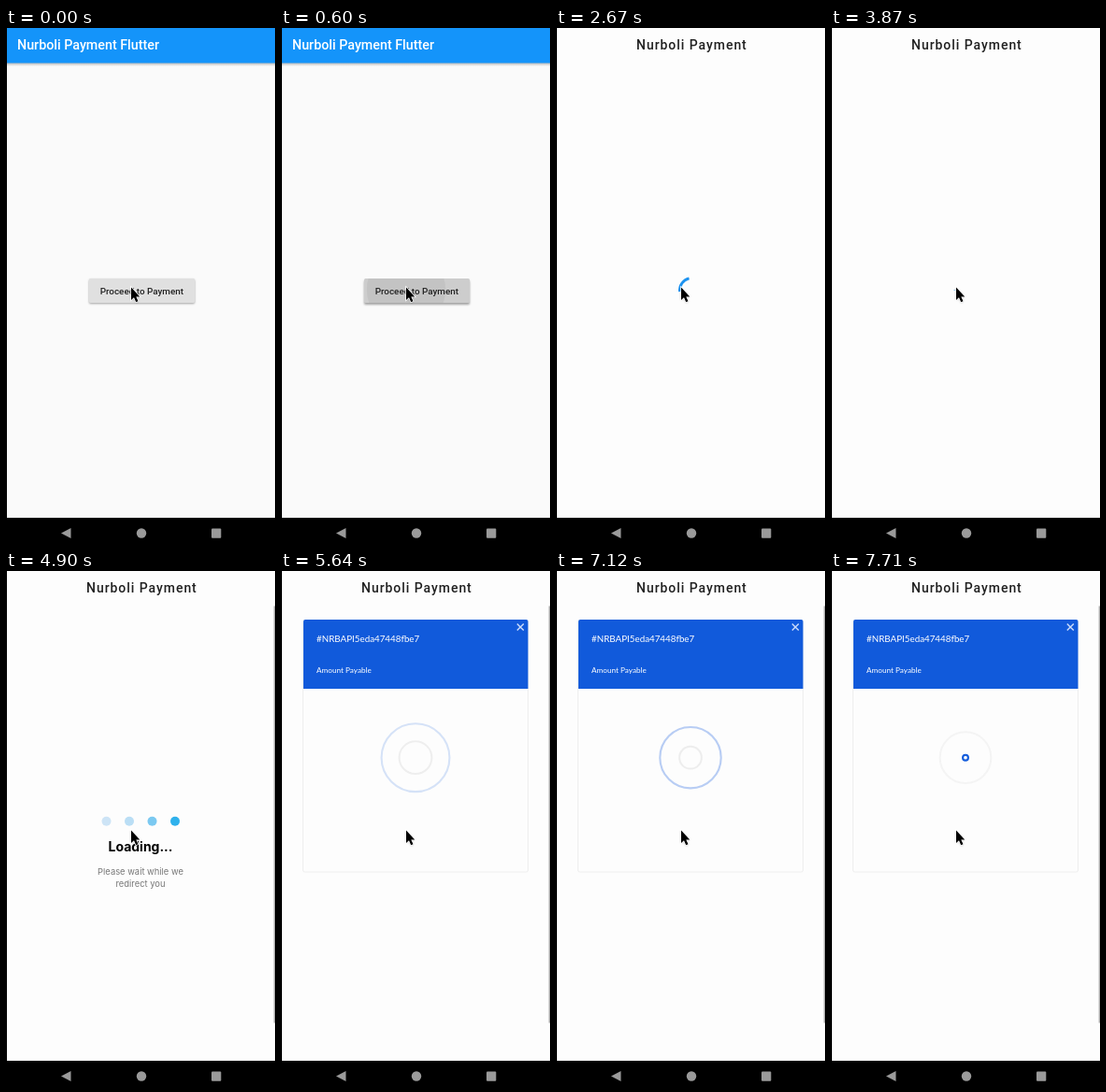
Animation, 288 px wide and 551 px high, one loop 8 s. Source, as an HTML page:

```html
<!DOCTYPE html>
<html lang="en">
<head>
<meta charset="utf-8">
<title>Payment demo</title>
<style>
html, body { margin: 0; width: 100%; height: 100%; overflow: hidden; background: #000; }
svg { display: block; width: 288px; height: 551px; }
text { font-family: Roboto, sans-serif; font-weight: 500; white-space: pre; }
.inter { font-family: Inter, sans-serif; text-anchor: middle; }
.lato { font-family: Lato, sans-serif; font-weight: 400; fill: #fff; }
</style>
</head>
<body>
<svg viewBox="0 0 288 551">
  <defs>
    <linearGradient id="fade" x2="0" y2="1">
      <stop stop-color="#000" stop-opacity=".28"/>
      <stop offset="1" stop-color="#000" stop-opacity="0"/>
    </linearGradient>
    <clipPath id="btnClip"><rect x="89" y="268" width="113" height="26" rx="1.5"/></clipPath>
    <filter id="soft" x="-30%" y="-50%" width="160%" height="200%"><feGaussianBlur stdDeviation="1"/></filter>
  </defs>
  <rect width="288" height="551"/>
  <rect id="page" x="1" width="287" height="524" fill="#fafafa"/>

  <g id="home">
    <rect x="1" y="37" width="287" height="4" fill="url(#fade)"/>
    <rect x="1" width="287" height="37.5" fill="#1494fa"/>
    <text x="12" y="23" font-size="14.3" fill="#fff">Nurboli Payment Flutter</text>
    <rect id="shade" x="89" y="269" width="113" height="26" rx="1.5" opacity=".35" filter="url(#soft)"/>
    <g clip-path="url(#btnClip)">
      <rect x="89" y="268" width="113" height="26" fill="#e0e0e0"/>
      <rect id="press" x="89" y="268" width="113" height="26" opacity="0"/>
      <circle id="splash" cx="134" cy="280" r="0" opacity="0"/>
    </g>
    <text x="100.7" y="284.5" font-size="9.9" fill="#222">Proceed to Payment</text>
  </g>

  <g id="pay">
    <text x="86" y="23" font-size="14" letter-spacing=".95" fill="#212121">Nurboli Payment</text>
    <path id="spinner" fill="none" stroke="#1d93f0" stroke-width="2.9"/>
    <path id="scroll" d="M287.3 37.5V483.5" stroke="#b4b4b4" stroke-width="1.4"/>
    <g id="loading">
      <g id="dots"></g>
      <text class="inter" x="144" y="300" font-size="14" style="font-weight:700" fill="#000">Loading...</text>
      <g font-size="9.4" fill="#777">
        <text class="inter" style="font-weight:400" x="144" y="325">Please wait while we</text>
        <text class="inter" style="font-weight:400" x="144" y="338">redirect you</text>
      </g>
    </g>
    <g id="card">
      <rect x="23.5" y="52.5" width="241" height="269.5" rx="2" fill="#fdfdfd" stroke="#eee"/>
      <path d="M24 126V54q0-2 2-2H262.500q2 0 2 2V126Z" fill="#115adb"/>
      <text class="lato" x="38" y="75.500" font-size="9.8">#NRBAPI5eda47448fbe7</text>
      <text class="lato" x="38" y="108.500" font-size="8.200">Amount Payable</text>
      <path d="M252.800 56.500l7 7m0-7l-7 7" stroke="#c9dafa" stroke-width="1.500"/>
      <circle id="grey" cx="144" cy="199.700" fill="none" stroke="#ebebeb" stroke-width="2"/>
      <circle id="blue" cx="144" cy="199.700" fill="none" stroke="#115adb" stroke-width="2.100"/>
    </g>
  </g>

  <g fill="#9a9a9a">
    <path d="M59 540.500L69.500 535V546Z"/>
    <circle cx="145" cy="540.500" r="5.200"/>
    <rect x="220" y="535.500" width="10.300" height="10.300" rx="1"/>
  </g>
  <path d="M134 278.500v13l3-2.500 2.200 5 2.300-1-2.200-5h4Z" opacity=".3" filter="url(#soft)"/>
  <path d="M134 277.500v13.500l3-2.700 2.200 4.900 2.300-1-2.200-4.800h4Z" stroke="#fff" stroke-width="1.500" paint-order="stroke"/>
</svg>
<script>
const LOOP = 8000, STEP = 148, LEAD = 300;
const PAGE_STEP = 5, LOAD_STEP = 28, CARD_STEP = 33;
const $ = id => document.getElementById(id);
const set = (id, attrs) => { for (const k in attrs) $(id).setAttribute(k, attrs[k]); };
const show = (id, on) => set(id, { visibility: on ? 'visible' : 'hidden' });
const clamp = v => Math.min(1, Math.max(0, v));

// Cubic Bezier easing, solved by bisection
function bezier(x1, y1, x2, y2) {
  const at = (a, b, s) => 3 * a * s * (1 - s) ** 2 + 3 * b * s * s * (1 - s) + s ** 3;
  return x => {
    let lo = 0, hi = 1;
    for (let i = 0; i < 24; i++) {
      const mid = (lo + hi) / 2;
      if (at(x1, x2, mid) < x) lo = mid; else hi = mid;
    }
    return at(y1, y2, lo);
  };
}
const fastSlow = bezier(.4, 0, .2, 1);
const grow = bezier(0, .2, .8, 1);
const dim = bezier(.2, 0, .8, 1);

const dots = [0, 1, 2, 3].map(i => {
  const dot = document.createElementNS('http://www.w3.org/2000/svg', 'circle');
  dot.setAttribute('cx', 107.5 + 24.5 * i);
  dot.setAttribute('cy', 267.7);
  dot.setAttribute('r', 5);
  return $('dots').appendChild(dot);
});

function drawPress(t) {
  const on = t >= LEAD, p = clamp((t - LEAD + 120) / 700);
  set('press', { opacity: on ? .09 * Math.sin(Math.PI * p) : 0 });
  set('splash', { r: 70 * p, opacity: on ? .12 * (1 - p) : 0 });
  set('shade', { y: on ? 269 + Math.sin(Math.PI * p) : 269 });
}

function drawSpinner(t) {
  const turns = Math.max(0, t - 1013) / 965, step = Math.floor(turns), p = turns - step;
  const head = fastSlow(clamp(p * 2)), tail = fastSlow(clamp(p * 2 - 1));
  const start = Math.PI * (-.5 + 1.5 * tail + 1.7 * p - .8 * step);
  const sweep = Math.max(.03, 1.5 * Math.PI * (head - tail));
  const point = a => `${145.5 + 13 * Math.cos(a)} ${280.5 + 13 * Math.sin(a)}`;
  set('spinner', { d: `M${point(start)}A13 13 0 ${+(sweep > Math.PI)} 1 ${point(start + sweep)}` });
}

function drawDots(head) {
  const glow = [1, .52, .12, 0], pale = [205, 228, 246], vivid = [47, 177, 236];
  dots.forEach((dot, i) => {
    const b = glow[head - i] || 0;
    dot.setAttribute('fill', `rgb(${pale.map((c, j) => Math.round(c + (vivid[j] - c) * b))})`);
  });
}

function drawRing(id, phase) {
  const p = phase - Math.floor(phase);
  set(id, { r: 41 * grow(p), 'stroke-opacity': 1 - dim(p) });
}

function draw(time) {
  // The picture advances in even steps, with three longer holds
  let k = Math.floor((time - LEAD) / STEP);
  if (k === 32 || k === 39 || k === 51) k--;
  const t = k < 0 ? 0 : LEAD + k * STEP + 6;
  const home = k < PAGE_STEP, card = k >= CARD_STEP, loading = k >= LOAD_STEP && !card;
  show('home', home);
  show('pay', !home);
  set('page', { fill: home ? '#fafafa' : '#fdfdfd' });
  $('pay').style.display = home ? 'none' : '';
  show('spinner', !home && k < LOAD_STEP);
  show('scroll', loading || card);
  show('loading', loading);
  show('card', card);
  if (home) drawPress(t);
  else if (card) {
    const phase = .785 + (t - 5640) / 1673;
    drawRing('blue', phase);
    drawRing('grey', phase + .5);
  } else if (loading) drawDots(k - LOAD_STEP);
  else drawSpinner(t);
}

const began = performance.now();
function tick() {
  draw((performance.now() - began) % LOOP);
  requestAnimationFrame(tick);
}
tick();
</script>
</body>
</html>
```
